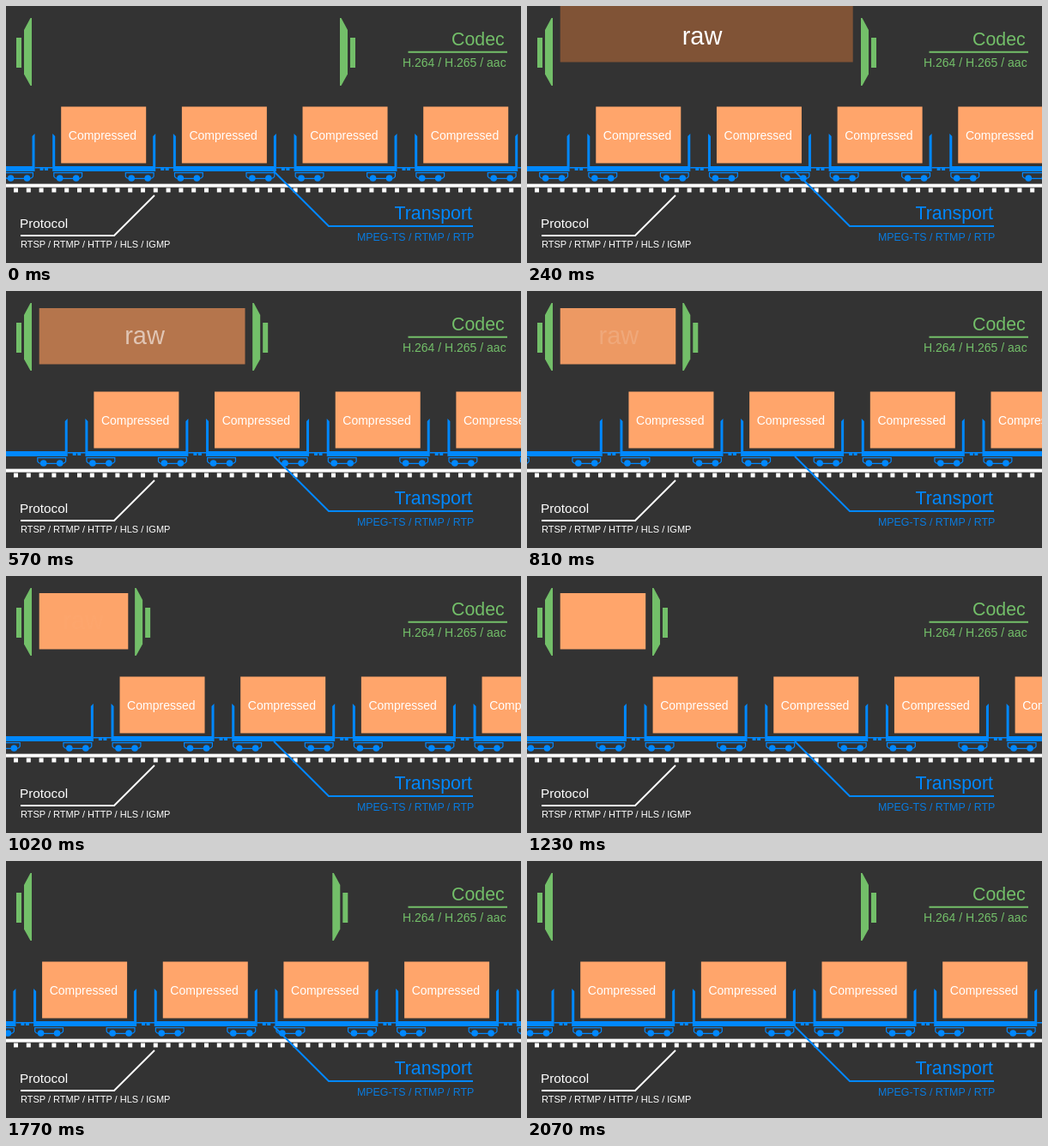
An HTML page for the animation above (2100 ms loop, 600 px wide and 300 px high).

```html
<!DOCTYPE html>
<html lang="en">
<head>
<meta charset="utf-8">
<title>Streaming train</title>
<style>
  html, body { margin: 0; width: 100%; height: 100%; overflow: hidden; background: #333; }
  svg { display: block; width: 600px; height: 300px; }
  text { font-family: "Liberation Sans", Arial, sans-serif; white-space: pre; }
  .green { fill: #73bf69; }
  .blue { fill: #0088ff; }
  .white { fill: #fff; }
  .line { fill: none; stroke-width: 2; }
</style>
</head>
<body>
<svg viewBox="0 0 600 300">
  <defs>
    <g id="bogie">
      <path d="M.6 194.6H33.4V199Q32 201.4 30 201.4H4Q2 201.4 .6 199Z" fill="#333" stroke="#0088ff" stroke-width="1.2"/>
      <circle class="blue" cx="7.5" cy="201" r="3.8"/>
      <circle class="blue" cx="26.5" cy="201" r="3.8"/>
    </g>
    <g id="car">
      <path class="blue" d="M-10 149L-7 152V187H107V152L110 149V193H-10Z"/>
      <path class="blue" d="M110 188H131V189.6H110ZM116 189.6H120V192H116ZM121.500 189.6H125.500V192H121.500Z"/>
      <use href="#bogie" x="-9"/>
      <use href="#bogie" x="74.500"/>
    </g>
    <g id="load">
      <rect y="117.500" width="99" height="66" fill="#ffa56b"/>
    </g>
    <g id="clamp" class="green">
      <rect x="12" y="37" width="6" height="35"/>
      <path d="M21 28L28.500 14H30V93H28.500L21 79.500Z"/>
    </g>
  </defs>

  <rect width="600" height="300" fill="#333"/>
  <use href="#clamp"/>
  <use href="#clamp" id="press"/>
  <g id="raw">
    <rect id="rawBox" x="38.700" height="65.500"/>
    <text id="rawText" class="white" font-size="29" text-anchor="middle">raw</text>
  </g>

  <rect class="white" y="207.600" width="600" height="4"/>
  <path d="M9 215H600" stroke="#fff" stroke-width="5" stroke-dasharray="5 9.800"/>

  <g id="falling">
    <use href="#load"/>
    <text id="fallingText" class="white" x="8.600" y="156" font-size="14">Compressed</text>
  </g>
  <g id="train"></g>

  <text class="green" x="519" y="46" font-size="21.330">Codec</text>
  <path class="line" d="M468.500 53.800H584" stroke="#73bf69"/>
  <text class="green" x="462" y="71" font-size="14">H.264 / H.265 / aac</text>

  <text class="blue" x="452.500" y="249" font-size="21.330">Transport</text>
  <path class="line" d="M544 257H376L312 193" stroke="#0088ff"/>
  <text class="blue" x="409" y="274" font-size="12.400" opacity=".85">MPEG-TS / RTMP / RTP</text>

  <text class="white" x="16" y="259" font-size="15.300">Protocol</text>
  <path class="line" d="M17 268H126L173 221" stroke="#fff"/>
  <text class="white" x="17" y="282" font-size="11">RTSP / RTMP / HTTP / HLS / IGMP</text>
</svg>
<script>
const LOOP = 2100, STEP = 30, PITCH = 140.67;
const DROP_END = 300, SQUEEZE = 850, FALL_START = 1330, LANDING = 1724;
const OPEN_START = 1300, OPEN = 600;

const byId = id => document.getElementById(id);
const clamp01 = v => Math.min(1, Math.max(0, v));
const mix = (a, b, p) => a + (b - a) * p;
const show = (el, on) => el.setAttribute("display", on ? "inline" : "none");
const move = (el, x, y = 0) => el.setAttribute("transform", `translate(${x} ${y})`);

// Cubic bezier easing with control points (.33, 0) and (.283, 1)
function ease(x) {
  x = clamp01(x);
  let lo = 0, hi = 1;
  for (let i = 0; i < 24; i++) {
    const s = (lo + hi) / 2, r = 1 - s;
    if (.99 * s * r * r + .849 * s * s * r + s * s * s < x) lo = s; else hi = s;
  }
  return lo * lo * (3 - 2 * lo);
}

const cars = [];
for (let k = -2; k <= 3; k++) {
  const car = document.createElementNS("http://www.w3.org/2000/svg", "g");
  car.innerHTML = `<g><use href="#load"/><text class="white" x="8.6" y="156" font-size="14">Compressed</text></g><use href="#car"/>`;
  byId("train").append(car);
  cars.push({ k, car, load: car.firstChild });
}

function draw(t) {
  const head = 64.2 + PITCH * t / LOOP;
  for (const { k, car, load } of cars) {
    move(car, head + PITCH * k);
    show(load, k >= 0 || (k === -1 && t >= LANDING));
  }

  const squeeze = ease((t - DROP_END) / SQUEEZE);
  const opening = ease((t - OPEN_START) / OPEN);
  byId("press").setAttribute("transform", `matrix(-1 0 0 1 ${419 - 243 * (squeeze - opening)} 0)`);

  const y = mix(-80, 20, clamp01(t / DROP_END));
  const box = byId("rawBox"), label = byId("rawText");
  show(byId("raw"), t < FALL_START);
  box.setAttribute("y", y);
  box.setAttribute("width", mix(341, 99.5, squeeze));
  const rgb = [[128, 255], [83, 165], [54, 107]].map(([a, b]) => Math.round(mix(a, b, squeeze)));
  box.setAttribute("fill", `rgb(${rgb})`);
  label.setAttribute("x", 204 - 116.5 * squeeze ** 1.16);
  label.setAttribute("y", 62 + (y - 20) * .86);
  label.setAttribute("opacity", 1 - squeeze);

  const fall = clamp01((t - FALL_START) / (LANDING - FALL_START));
  show(byId("falling"), t >= FALL_START && t < LANDING);
  move(byId("falling"), 39, mix(-97.5, 0, fall * fall * (3 - 2 * fall)));
  byId("fallingText").setAttribute("opacity", fall);
}

const start = performance.now();
function tick() {
  const t = (performance.now() - start) % LOOP;
  draw(Math.floor(t / STEP) * STEP);
  requestAnimationFrame(tick);
}
draw(0);
requestAnimationFrame(tick);
</script>
</body>
</html>
```
